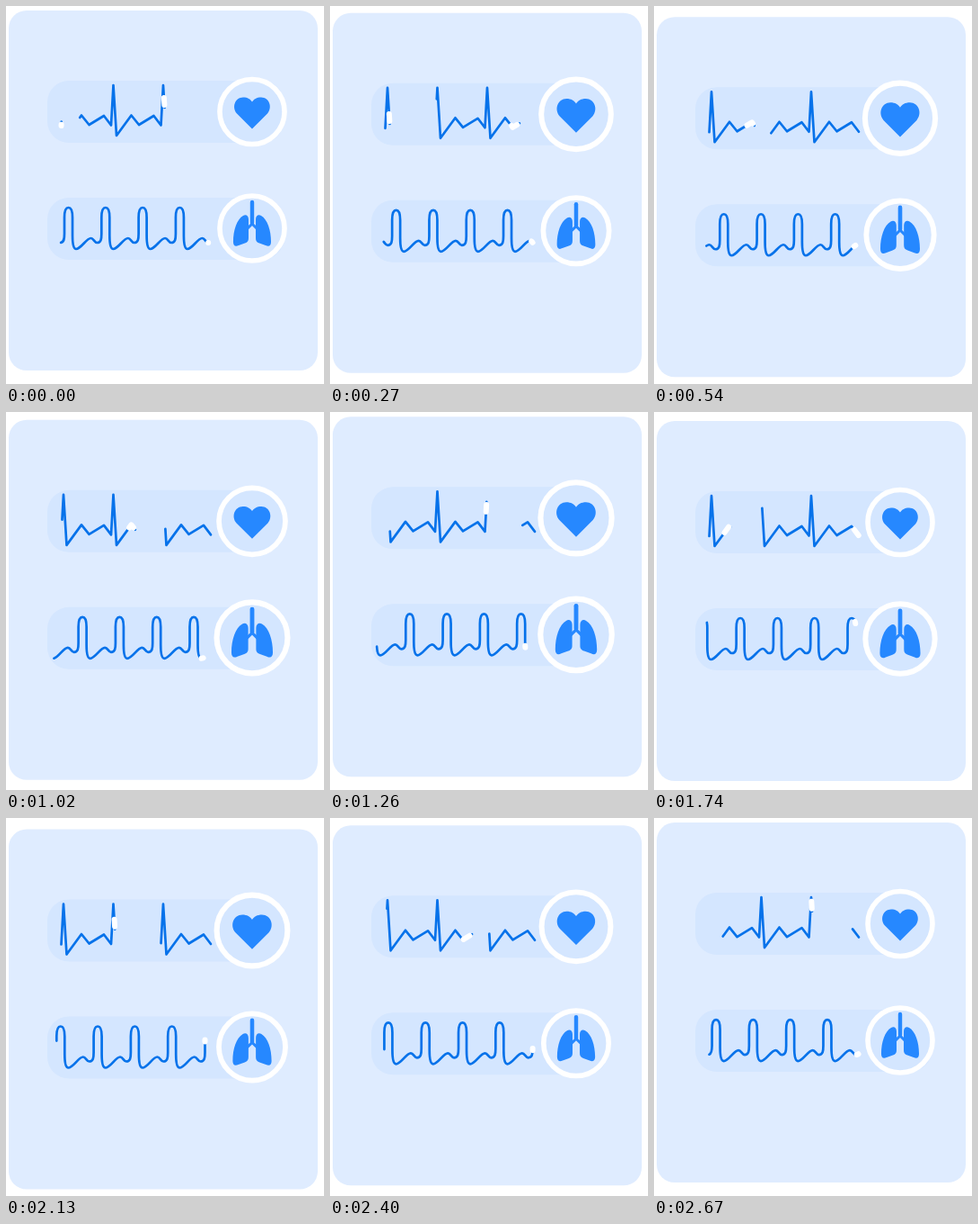
These frames come from a looping animation (354x420 px, 2.7 s). An HTML page:

```html
<!DOCTYPE html>
<html lang="en">
<head>
<meta charset="utf-8">
<title>Vital signs</title>
<style>
  html, body { margin: 0; width: 100%; height: 100%; overflow: hidden; background: #fff; }
  svg { display: block; width: 354px; height: 420px; }
  .pill { fill: #d4e6ff; }
  .icon { fill: #2688ff; }
  .ring { fill: #d4e6ff; stroke: #fff; stroke-width: 5.6; }
  .line, .tip { fill: none; stroke-linecap: round; stroke-linejoin: round; }
  .line { stroke: #0672ea; stroke-width: 2.7; }
  .tip { stroke: #fff; stroke-width: 6; }
  .tube { fill: none; stroke: #2688ff; stroke-linecap: round; stroke-linejoin: round; }
</style>
</head>
<body>
<svg viewBox="0 0 354 420">
  <g id="card">
    <rect x="3" width="344" height="400" rx="20" fill="#dfecff"/>
    <rect class="pill" x="46" y="78" width="263" height="69" rx="24"/>
    <rect class="pill" x="46" y="208" width="263" height="69" rx="24"/>
    <g id="ecg"></g>
    <g id="breath"></g>
    <g id="heart">
      <circle class="ring" r="36"/>
      <path class="icon" d="M0 19L-17 2C-23-5-19-16-10-16C-5-16-2-14 0-11C2-14 5-16 10-16C19-16 23-5 17 2Z"/>
    </g>
    <g id="lungs">
      <circle class="ring" r="36"/>
      <path class="tube" stroke-width="4.4" d="M0-29V-6"/>
      <path class="tube" stroke-width="3" d="M-5 0L0-5L5 0"/>
      <path id="lobe" class="icon" d="M-4-10C-4-14-7-16-10-14C-17-10-21 2-21 15C-21 19-19 21-15 19L-8 16.500C-5 15.500-4 14-4 11Z"/>
      <use href="#lobe" transform="scale(-1 1)"/>
    </g>
  </g>
</svg>
<script>
const LOOP = 2700, TAU = Math.PI * 2;
const $ = id => document.getElementById(id);

function addPath(parent, className, d, pathLength) {
  const path = document.createElementNS('http://www.w3.org/2000/svg', 'path');
  path.setAttribute('class', className);
  path.setAttribute('d', d);
  path.setAttribute('pathLength', pathLength);
  parent.append(path);
  return path;
}

// Show only the stretch of a path from start to start + length.
function showStretch(path, start, length) {
  path.style.strokeDasharray = `${length} 9999`;
  path.style.strokeDashoffset = -start;
}

const BEAT_STEP = 55.5, ECG_LENGTH = 525.5;
const beat = [[64, 83], [67.5, 139], [84, 116.5], [92.5, 127], [109, 117], [117, 127.5]];
let ecgPath = 'M61.5 128';
for (let i = 0; i < 3; i++)
  for (const [x, y] of beat) ecgPath += `L${x + i * BEAT_STEP} ${y}`;

const ECG_DASH = 294, ECG_SPEED = 0.301;
const traces = [126, -290, -687].map(start => ({
  start,
  line: addPath($('ecg'), 'line', ecgPath, ECG_LENGTH),
  tip: addPath($('ecg'), 'tip', ecgPath, ECG_LENGTH)
}));

const WAVE = 41.3, WAVE_ARC = 120.6;
let breathPath = `M${60 - WAVE} 258`;
for (let i = -1; i < 4; i++)
  breathPath += 'c4.500 0 5-4 5-10v-18c0-7.500 1.500-11 4.500-11s4.500 3.500 4.500 11v20'
    + 'c0 10 1 15 4 15c5.500 0 11.500-12 16.500-12c3 0 4 5 6.800 5';
const breathLine = addPath($('breath'), 'line', breathPath, 5 * WAVE_ARC);
const breathTip = addPath($('breath'), 'tip', breathPath, 5 * WAVE_ARC);

function pulse(id, y, phase) {
  const scale = 1.052 + 0.052 * Math.cos(TAU * (phase - 0.465));
  $(id).setAttribute('transform', `translate(274 ${y}) scale(${scale})`);
}

function draw(now) {
  const t = now % LOOP, p = t / LOOP, a = TAU * p;
  $('card').setAttribute('transform', `translate(0 ${9 - 4 * Math.cos(2 * a)})`);
  pulse('heart', 112.5, 3 * p);
  pulse('lungs', 242, p);

  for (const { start, line, tip } of traces) {
    const tail = start + ECG_SPEED * t;
    showStretch(line, tail, ECG_DASH);
    showStretch(tip, tail + ECG_DASH - 11, 8);
  }

  // The wave drifts right while its visible stretch slides back along it.
  const slide = WAVE_ARC * p - 6.7 * Math.sin(a) - 7 * (1 - Math.cos(a));
  const tail = WAVE_ARC + 1 - slide;
  $('breath').setAttribute('transform', `translate(${WAVE * p} 0)`);
  showStretch(breathLine, tail, 4 * WAVE_ARC);
  showStretch(breathTip, tail + 4 * WAVE_ARC - 1, 2);
}

const begin = performance.now();
function tick() {
  draw(performance.now() - begin);
  requestAnimationFrame(tick);
}
tick();
</script>
</body>
</html>
```
